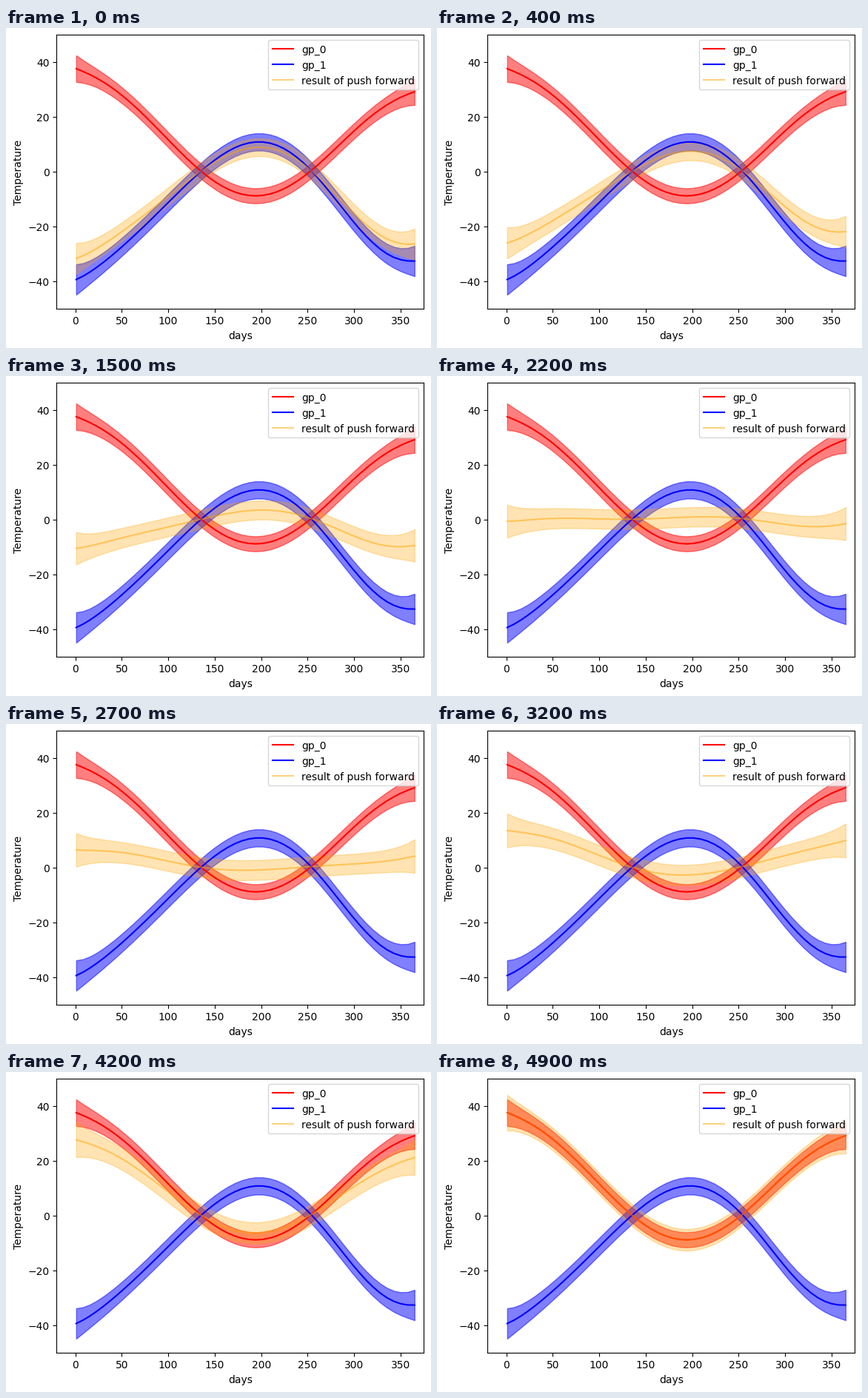
These frames come from a looping animation (574 by 432 pixels, 5000 ms). A matplotlib script:

```python
import matplotlib.pyplot as plt
import numpy as np
from matplotlib.animation import FuncAnimation
from matplotlib.transforms import Affine2D

WIDTH, HEIGHT, DPI = 574, 432, 100
FRAMES, INTERVAL = 50, 100
AXES_W, AXES_H, PAD = 496, 369.6, 10

days = np.linspace(1, 365, 50)


def smooth_curve(*temperatures):
    """Polynomial through evenly spaced temperatures over the year."""
    count = len(temperatures)
    coeffs = np.polyfit(np.linspace(-1, 1, count), temperatures, count - 1)
    return np.polyval(coeffs, np.linspace(-1, 1, days.size))


def half_width(middle, end):
    """Uncertainty that is flat in the middle and flares at both ends."""
    flare = np.exp((1 - days) / 18) + np.exp((days - 365) / 18)
    return middle + (end - middle) * flare


warm = smooth_curve(37.6, 27.1, 9.9, -5.1, -8.2, 2.5, 18.8, 29.2)
cold = smooth_curve(-39.4, -26.6, -9.6, 5.9, 10.45, -2.3, -23.6, -32.65)
warm_half = half_width(2.75, 4.85)
cold_half = half_width(3.15, 5.55)
pushed_half = half_width(3.95, 6.5)

fig = plt.figure(figsize=(WIDTH / DPI, HEIGHT / DPI), dpi=DPI)
ax = fig.add_axes([0, 0, 1, 1])


def place_axes(left, bottom):
    ax.set_position([left / WIDTH, bottom / HEIGHT,
                     AXES_W / WIDTH, AXES_H / HEIGHT])


def draw_band(mean, half, color, alpha):
    return ax.fill_between(days, mean - half, mean + half,
                           color=color, alpha=alpha)


draw_band(warm, warm_half, "red", 0.5)
draw_band(cold, cold_half, "blue", 0.5)
ax.plot(days, warm, color="red", label="gp_0")
ax.plot(days, cold, color="blue", label="gp_1")
pushed_line, = ax.plot(days, cold, color="orange", alpha=0.5,
                       label="result of push forward")
ax.set(xlim=(-20, 375), ylim=(-50, 50), xlabel="days", ylabel="Temperature")
legend = ax.legend(loc="upper right")

# Shift the axes so the labels keep an even margin to the figure edge.
left, bottom = 68.5, 52.6
place_axes(left, bottom)
extent = fig.get_tightbbox()
left += PAD - extent.x0 * DPI
bottom += PAD - extent.y0 * DPI
place_axes(left, bottom)

# Text sits lower by the part of a pixel that the figure height cuts off.
# The x label follows its tick labels.
drop = Affine2D().translate(0, HEIGHT - (bottom + AXES_H + PAD))
for text in [*ax.get_xticklabels(), *ax.get_yticklabels(),
             ax.yaxis.label, *legend.get_texts()]:
    text.set_transform(text.get_transform() + drop)

pushed_band = None


def update(frame):
    global pushed_band
    s = 0.1 + 0.9 * frame / (FRAMES - 1)
    mean = (1 - s) * cold + s * warm
    half = (1 - s) * cold_half + s * pushed_half
    if pushed_band is not None:
        pushed_band.remove()
    pushed_band = draw_band(mean, half, "orange", 0.3)
    pushed_line.set_ydata(mean)
    return pushed_band, pushed_line


anim = FuncAnimation(fig, update, frames=FRAMES, interval=INTERVAL,
                     repeat=True, repeat_delay=0, blit=False)
plt.show()
```
